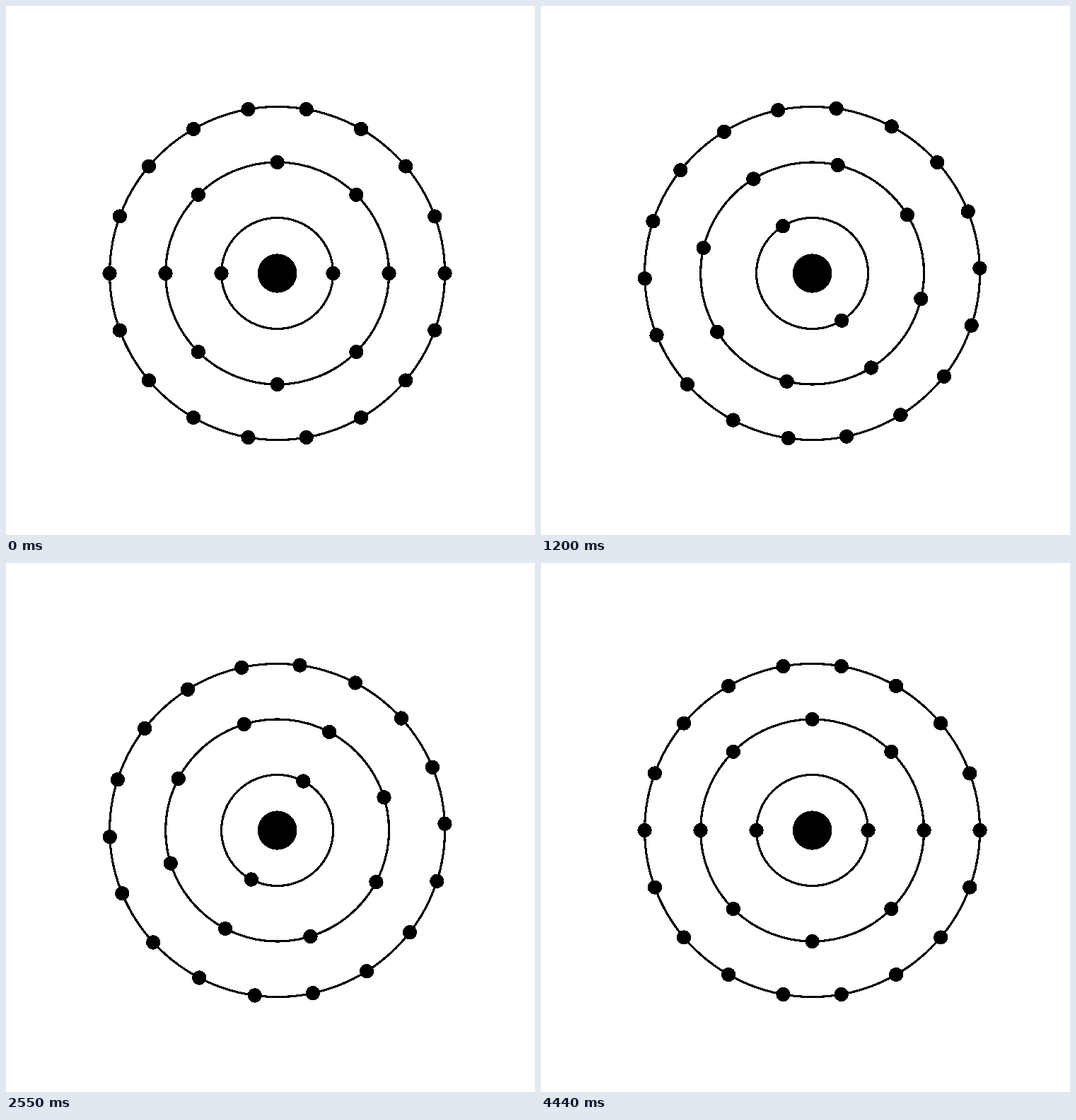
These frames come from a looping animation (748x748 px, 4.5 s). An HTML page:

```html
<!DOCTYPE html>
<html lang="en">
<head>
<meta charset="utf-8">
<title>Electron shells</title>
<style>
  html, body { margin: 0; width: 100%; height: 100%; overflow: hidden; background: #fff; }
  svg { display: block; width: 100%; height: 100%; }
</style>
</head>
<body>
<svg viewBox="0 0 748 748" shape-rendering="crispEdges">
  <g transform="translate(383.6 378) scale(1 .994)">
    <g id="rings" fill="none" stroke="#000" stroke-width="3.2"></g>
    <circle r="27.8"/>
    <g id="electrons"></g>
  </g>
</svg>
<script>
  const LOOP = 4500, STEP = 30, TURN = 720;
  const RAMP = 0.03; // share of the loop spent speeding up
  const SHELLS = [[79, 2], [158, 8], [237, 18]];

  const rings = document.getElementById('rings');
  const electrons = document.getElementById('electrons');

  function addCircle(parent, cx, cy, r) {
    const c = document.createElementNS('http://www.w3.org/2000/svg', 'circle');
    c.setAttribute('cx', cx);
    c.setAttribute('cy', cy);
    c.setAttribute('r', r);
    parent.appendChild(c);
  }

  for (const [radius, count] of SHELLS) {
    addCircle(rings, 0, 0, radius);
    for (let i = 0; i < count; i++) {
      const a = 2 * Math.PI * i / count;
      addCircle(electrons, radius * Math.cos(a), radius * Math.sin(a), 10.2);
    }
  }

  // Short cubic ease-in joined smoothly to a long cubic ease-out.
  function ease(p) {
    return p < RAMP
      ? p ** 3 / RAMP ** 2
      : 1 - (1 - p) ** 3 / (1 - RAMP) ** 2;
  }

  const start = performance.now();

  function draw() {
    const t = (performance.now() - start) % LOOP;
    const p = Math.floor(t / STEP) * STEP / LOOP;
    electrons.setAttribute('transform', `rotate(${TURN * ease(p)})`);
    requestAnimationFrame(draw);
  }
  draw();
</script>
</body>
</html>
```
